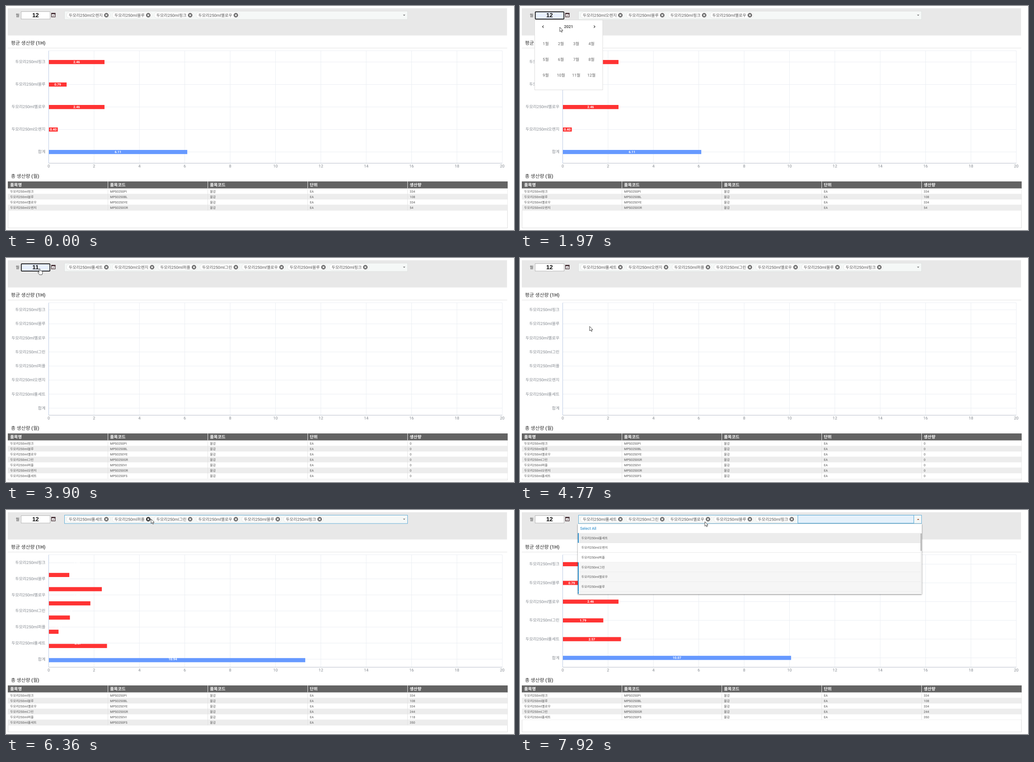
These frames come from a looping animation (1124 px wide and 498 px high, 7990 ms). An HTML page:

```html
<!DOCTYPE html>
<html lang="ko">
<head>
<meta charset="utf-8">
<title>평균 생산량</title>
<style>
  html, body { margin: 0; width: 100%; height: 100%; overflow: hidden; background: #fff; }
  svg { display: block; width: 100vw; height: 100vh; }
  text { font: 9px Roboto, "Noto Sans CJK KR", "Noto Sans CJK", sans-serif; fill: #444; text-rendering: geometricPrecision; }
  .axis { fill: #858a91; }
  .chip { fill: #555; }
  .title { font-size: 10.8px; font-weight: 500; fill: #333; }
  .head { font-size: 9.3px; font-weight: 700; fill: #fff; }
  .cell { font-size: 7px; fill: #555; }
  .value { font-size: 7.3px; font-weight: 700; fill: #fff; }
  .month { font: 700 13.3px "Liberation Sans", Arial, sans-serif; fill: #111; }
  .year { font-weight: 500; font-size: 8.8px; fill: #333; }
  .day { fill: #666; }
  .all { font-size: 8.7px; fill: #1a84c7; }
  .glow { fill: #ffe81a; opacity: .75; mix-blend-mode: multiply; }
</style>
</head>
<body>
<svg viewBox="0 0 1124 498" preserveAspectRatio="none">
  <g id="scene"></g>
  <g id="pointer">
    <circle id="glow" class="glow" cx="1" cy="4" r="7.5"/>
    <path id="arrow" d="M0 0V10L2.4 8L4 11.4L5.6 10.6L4.1 7.4H7Z" fill="#fff" stroke="#333" stroke-width=".9"/>
    <path id="hand" d="M-.9 8V1.2Q0 -.4 1.2 1.2V5.2Q2.4 4.4 3.2 5.7Q4.4 5.1 5.1 6.3Q6.6 6 6.8 7.4V10.8L5.6 14.2H.2L-3.4 9.4Q-3.4 7.8 -2.2 8L-.9 9.2Z" fill="#fff" stroke="#333" stroke-width=".9"/>
  </g>
</svg>
<script>
const LOOP = 7990, GROW = 350, BRAND = '두모리250ml';
const X0 = 94.5, TOP = 99.5, BOTTOM = 349.5, UNIT = 50.18;

// colour: code, amount, hourly rate
const GOODS = {
  핑크: ['PI', 334, 2.46], 블루: ['BL', 108, .79], 옐로우: ['YE', 334, 2.46],
  그린: ['GR', 244, 1.79], 퍼플: ['VI', 118, .87], 오렌지: ['OR', 54, .4], 풀세트: ['FS', 350, 2.57]
};
const ALL = Object.keys(GOODS);
const without = (...gone) => ALL.filter(n => !gone.includes(n));
const state = (at, names, empty, chips) => ({
  at, names, empty, chips: chips || [...names].reverse(),
  rates: names.map(n => empty ? 0 : GOODS[n][2])
});
const STATES = [
  state(-1000, without('그린', '퍼플', '풀세트'), false, ['오렌지', '블루', '핑크', '옐로우']),
  state(2880, ALL, true),
  state(4890, ALL, false),
  state(6270, without('오렌지'), false),
  state(7340, without('오렌지', '퍼플'), false)
];

// time, x, y
const PATH = [
  [340, 1080, 475], [1090, 167, 60], [1320, 74, 23], [1700, 74, 23], [1970, 88, 47],
  [2350, 154, 146], [2600, 122, 150], [2950, 122, 150], [3520, 74, 23], [4030, 74, 23],
  [4380, 154, 152], [5320, 154, 152], [5950, 322, 18], [6200, 322, 18], [6360, 321, 20],
  [6850, 321, 20], [7130, 311, 17], [7620, 311, 17], [7920, 409, 26]
];
const during = (t, ...spans) => spans.some(([a, b]) => t >= a && t < b);
const mix = (a, b, p) => a + (b - a) * p;
const cubic = p => p < .5 ? 4 * p ** 3 : 1 - 4 * (1 - p) ** 3;

const rect = (x, y, w, h, fill, more = '') => `<rect x="${x}" y="${y}" width="${w}" height="${h}" fill="${fill}" ${more}/>`;
const path = (d, stroke, more = '') => `<path d="${d}" fill="none" stroke="${stroke}" ${more}/>`;
const text = (x, y, s, cls = '', anchor = 'start') => `<text x="${x}" y="${y}" class="${cls}" text-anchor="${anchor}">${s}</text>`;
const $ = id => document.getElementById(id);

function pointerAt(t) {
  const i = PATH.findIndex(k => k[0] > t);
  if (i === 0) return PATH[0].slice(1);
  if (i < 0) return PATH[PATH.length - 1].slice(1);
  const [a, b] = [PATH[i - 1], PATH[i]];
  const p = (t - a[0]) / (b[0] - a[0]), e = p * p * (3 - 2 * p);
  return [mix(a[1], b[1], e), mix(a[2], b[2], e)];
}

function toolbar(t, now, [px, py]) {
  const focus = during(t, [1500, 2660], [3600, 4450]);
  const month = during(t, [2820, 4500]) ? '11' : '12';
  const active = t >= 6180, open = t >= 6480;
  let s = rect(4, 5, 1104.5, 60.5, '#e8e8e8') + text(21.5, 24, '월');
  s += focus
    ? rect(33.8, 12.8, 63.4, 16.4, '#e8f0fe', 'rx="1.5" stroke="#111" stroke-width="1.7"')
    : rect(33.5, 12.5, 64, 16.5, '#fff', 'stroke="#b5b5b5"');
  s += text(65.3, 25.2, month, 'month', 'middle');
  s += rect(100.6, 16.3, 8.2, 8, '#fff', 'stroke="#3a2228" stroke-width="1.2"')
    + rect(100, 15.6, 9.4, 2.6, '#3a2228') + path('M102.6 21L104.2 22.6L107 19.6', '#3a2228');
  s += rect(129.5, 11.5, 759, 18.5, '#f5f8f7', `stroke="${active ? '#62aed8' : '#dfe2e1'}"`);
  let x = 139;
  for (const name of now.chips) {
    const pitch = 67.6 + name.length * 8.4 + 8.3, cx = x + pitch - 18;
    const dark = Math.hypot(px - cx, py - 20.5) < 6.6;
    s += rect(x - 5, 13.5, pitch - 5, 13.5, '#fff', 'rx="6.7" stroke="#e2e4e3" stroke-width=".8"')
      + text(x, 23.7, BRAND + name, 'chip')
      + `<circle cx="${cx}" cy="20.5" r="5" fill="${dark ? '#333' : '#6b6b6b'}"/>`
      + path(`M${cx - 2} 18.5l4 4m0 -4l-4 4`, '#fff', 'stroke-width="1.3"');
    x += pitch;
  }
  if (t >= 7340) s += rect(x - 4.5, 11.5, 256.5, 17.8, '#e5f1fb', 'stroke="#4aa3d3"');
  s += open ? '<path d="M878.5 22h5l-2.5 -2.8z" fill="#a0522d"/>' : '<path d="M878.5 19.3h5l-2.5 2.8z" fill="#777"/>';
  return s;
}

function chart(t, now, before) {
  const n = now.names.length + 1, step = (BOTTOM - TOP) / n;
  let s = text(11, 86, '평균 생산량 (1H)', 'title') + path('M4 93.5H1109', '#e2e2e2');
  const rowY = i => TOP + step * (i + .5);
  let grid = `M${X0} ${TOP}H1098`;
  for (let i = 0; i < n; i++) grid += `M${X0} ${rowY(i)}H1098`;
  for (let v = 2; v <= 20; v += 2) grid += `M${X0 + v * UNIT} ${TOP}V${BOTTOM}`;
  s += path(grid, '#e9ecf2', 'stroke-width=".9"');
  for (let v = 0; v <= 20; v += 2) s += text(X0 + v * UNIT, 358.6, v, 'axis', 'middle');
  [...now.names.map(c => BRAND + c), '합계'].forEach((c, i) => s += text(87.2, rowY(i) + 2.9, c, 'axis', 'end'));

  // Bars are matched from the bottom row upwards.
  const rows = st => [...st.rates, st.rates.reduce((a, b) => a + b, 0)].reverse();
  const p = before ? cubic(Math.min(1, (t - now.at) / GROW)) : 1;
  const old = before ? rows(before) : [], oldStep = (BOTTOM - TOP) / (old.length || 1);
  let labels = '';
  rows(now).forEach((rate, i) => {
    const y = BOTTOM - step * (i + .5);
    const from = i < old.length ? old[i] : 0;
    const fromY = i < old.length ? BOTTOM - oldStep * (i + .5) : y;
    const w = mix(from, rate, p) * UNIT;
    if (w > .05) s += rect(X0, mix(fromY, y, p) - 4.5, w, 9.2, i ? '#ff3333' : '#6699ff');
    if (rate) labels += text(X0 + rate * UNIT / 2, y + 2.6, rate.toFixed(2), 'value', 'middle');
  });
  return s + labels + path(`M${X0} ${TOP}V${BOTTOM}`, '#bccbe4') + path(`M${X0} ${BOTTOM}H1098`, '#b9bfca');
}

function table(now) {
  const cols = [0, 1, 2, 3, 4].map(i => 4.5 + i * 221), end = 406 + now.names.length * 12.08;
  let s = text(11, 382, '총 생산량 (월)', 'title');
  s += rect(4.5, 390.5, 1105, 103, '#fff', 'stroke="#ddd"') + rect(4, 390, 1106, 15.5, '#636363');
  now.names.forEach((name, r) => {
    const y = 406 + r * 12.08, [code, amount] = GOODS[name];
    s += rect(4, y, 1105.5, 12.08, r % 2 ? '#ededed' : '#fff') + path(`M4 ${y + 12}H1109.5`, '#e4e4e4', 'stroke-width=".6"');
    [BRAND + name, 'MPS0250' + code, '물감', 'EA', now.empty ? 0 : amount]
      .forEach((v, c) => s += text(cols[c] + 4.8, y + 8.5, v, 'cell'));
  });
  ['품목명', '품목코드', '품목코드', '단위', '생산량'].forEach((h, c) => {
    s += text(cols[c] + 4.8, 401.2, h, 'head');
    if (c) s += path(`M${cols[c]} 390V405.5`, '#e8e8e8') + path(`M${cols[c]} 406V${end}`, '#e0e0e0', 'stroke-width=".8"');
  });
  return s;
}

function calendar([px, py]) {
  let s = rect(32.5, 31, 150.5, 155.5, '#fff', 'stroke="#dcdcdc"');
  s += path('M52.3 43.3L49.6 46L52.3 48.7M163.3 43.3L166 46L163.3 48.7', '#333', 'stroke-width="1.2"');
  s += text(107.5, 49, 2021, 'year', 'middle');
  for (let m = 0; m < 12; m++) {
    const x = 57 + m % 4 * 33.7, y = 83.5 + (m >> 2) * 35;
    if (Math.abs(px - x) < 15 && Math.abs(py - y) < 15) s += rect(x - 10, y - 10, 19, 20, '#eee', 'rx="2"');
    s += text(x, y + 3.2, m + 1 + '월', 'day', 'middle');
  }
  return s;
}

function dropdown(now) {
  let s = rect(128, 31, 761, 156, '#fff', 'style="filter:drop-shadow(0 1px 1.5px #0008)"') + text(133, 44.2, 'Select All', 'all');
  [...ALL].reverse().forEach((name, i) => {
    const y = 51.3 + i * 21.7, h = Math.min(21.7, 186.5 - y), on = now.chips.includes(name);
    if (on) s += rect(128, y, 758, h, i ? '#f6f6f6' : '#ececec') + rect(128, y, 2, h, '#2a8fcf');
    if (i < 6) s += path(`M130 ${y + 21.5}H886`, '#e2e2e2', 'stroke-width=".8"') + text(135.8, y + 13.3, BRAND + name, 'cell');
  });
  return s + rect(886, 51.3, 3, 135, '#f1f1f1') + rect(886, 52, 3, 39, '#bdbdbd', 'rx="1"');
}

let last = '';
function draw(t) {
  const i = STATES.findLastIndex(st => t >= st.at), now = STATES[i], at = pointerAt(t);
  let s = toolbar(t, now, at) + chart(t, now, STATES[i - 1]) + table(now);
  if (during(t, [1650, 2820], [3960, 4500])) s += calendar(at);
  if (t >= 6480) s += dropdown(now);
  if (s !== last) $('scene').innerHTML = last = s;

  const hand = during(t, [1240, 1800], [3420, 4080], [5880, 6240], [7050, 7640]);
  const show = (id, on) => $(id).setAttribute('visibility', on ? 'visible' : 'hidden');
  const seen = t >= 340;
  show('arrow', seen && !hand);
  show('hand', seen && hand);
  show('glow', seen && during(t, [1480, 1640], [2660, 2820], [3640, 3800], [4400, 4520], [6080, 6220], [7190, 7330]));
  $('pointer').setAttribute('transform', `translate(${at[0].toFixed(2)} ${at[1].toFixed(2)})`);
}

const start = performance.now();
function tick() {
  draw((performance.now() - start) % LOOP);
  requestAnimationFrame(tick);
}
draw(0);
requestAnimationFrame(tick);
</script>
</body>
</html>
```
